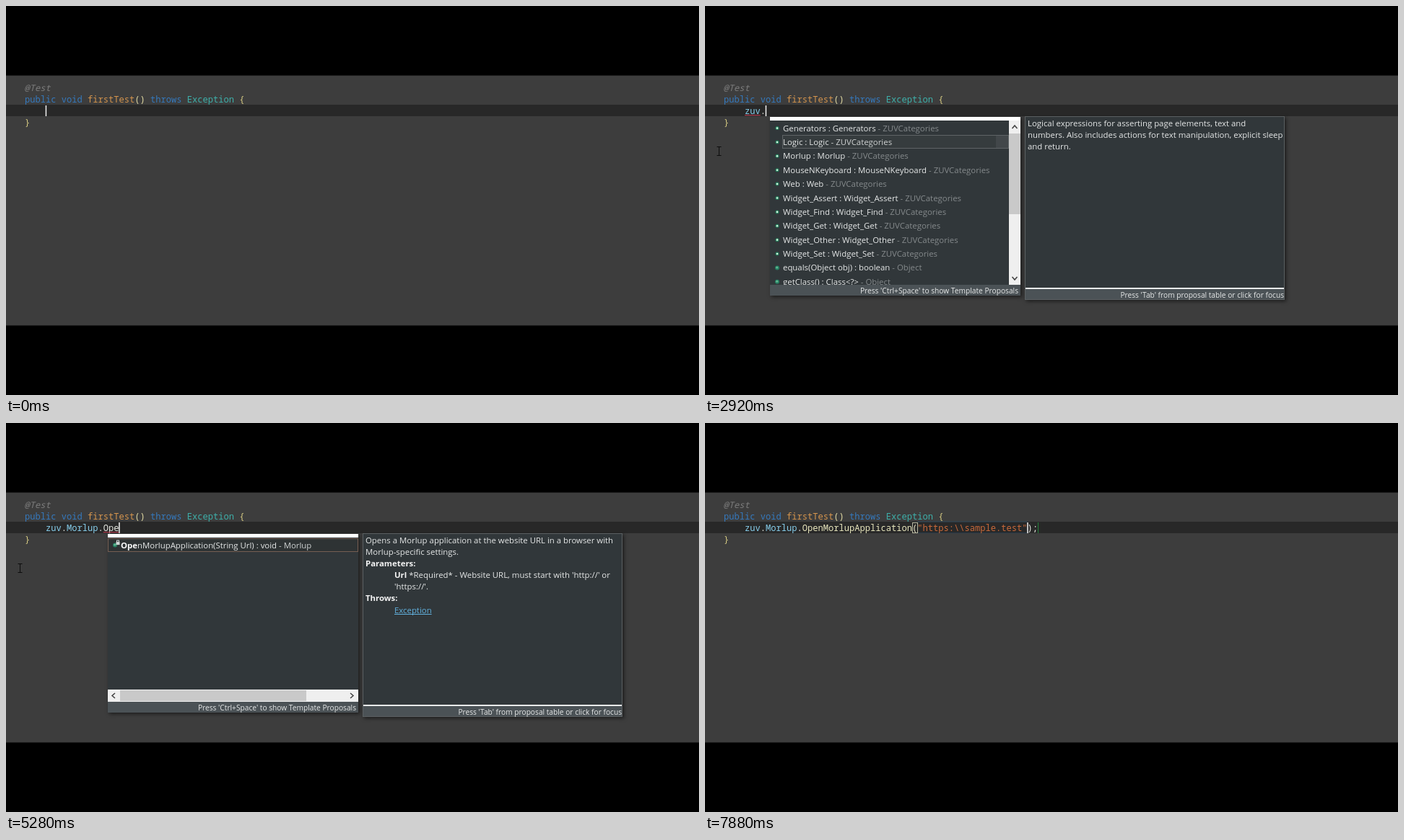
An HTML page with a canvas that plays this animation: 960x540 px, repeating every 7920 ms.

```html
<!DOCTYPE html>
<html lang="en">
<head>
<meta charset="utf-8">
<title>Code completion</title>
<style>
html, body { margin: 0; width: 100%; height: 100%; overflow: hidden; background: #000; }
canvas { display: block; width: 960px; height: 540px; }
</style>
</head>
<body>
<canvas id="stage" width="960" height="540"></canvas>
<script>
const ctx = document.getElementById('stage').getContext('2d');
const LOOP = 7920;
const CODE = '12.08px "Noto Sans Mono", "DejaVu Sans Mono", monospace';
const UI = '11.4px "Open Sans", "Noto Sans", sans-serif';
const UI_BOLD = 'bold ' + UI;
const UI_SMALL = '10.2px "Open Sans", "Noto Sans", sans-serif';
const CHAR = 7.25, INDENT = 55, ROW = 19.38;
const PANEL = '#31373a', BAR = '#4b5256', TEXT = '#e6e8e8', DIM = '#858a8c';

const OBJ = 'zuv', GROUP = 'Morlup', METHOD = 'OpenMorlupApplication';
const HEAD = OBJ + '.' + GROUP + '.';
const URL_TEXT = '"https:\\\\sample.test"';
const URL_X = INDENT + (HEAD.length + METHOD.length + 1) * CHAR;

const KEYS = [
  [0, ''], [560, 'z'], [720, 'zu'], [880, OBJ], [1120, OBJ + '.'],
  [3400, OBJ + '.' + GROUP], [3640, HEAD],
  [4160, HEAD + 'O'], [4560, HEAD + 'Op'], [4720, HEAD + 'Ope']
];
const INSERT = 5680, QUOTE = 6440, KEY_GAP = 56;

// "~" starts the dimmed part of a row, "|" toggles bold
const CATEGORIES = ['Generators', 'Logic', GROUP, 'MouseNKeyboard', 'Web',
  'Widget_Assert', 'Widget_Find', 'Widget_Get', 'Widget_Other', 'Widget_Set']
  .map(n => ({ text: `${n} : ${n}~ - ZUVCategories`, icon: 'field' }))
  .concat([
    { text: 'equals(Object obj) : boolean~ - Object', icon: 'method' },
    { text: 'getClass() : Class<?>~ - Object', icon: 'method' }
  ]);
const OPEN_TAIL = `MorlupApplication(String Url) : void~ - ${GROUP}`;
const MATCHES = [
  { text: 'hashC|o|de() : int~ - Object', icon: 'method' },
  { text: `L|o|gin(String Username, String Password, Boolean UseMpid) : void~ - ${GROUP}`, icon: 'final' },
  { text: `L|o|gout() : void~ - ${GROUP}`, icon: 'final' },
  { text: 'n|o|tify() : void~ - Object', icon: 'method' },
  { text: 'n|o|tifyAll() : void~ - Object', icon: 'method' },
  { text: '|O|pen' + OPEN_TAIL, icon: 'final' },
  { text: 't|o|String() : String~ - Object', icon: 'method' }
];
const MEMBERS = CATEGORIES.slice(10).concat(
  MATCHES.map(r => ({ ...r, text: r.text.replaceAll('|', '') })));

function rect(x, y, w, h, color) {
  ctx.fillStyle = color;
  ctx.fillRect(x, y, w, h);
}

function outline(x, y, w, h, color) {
  ctx.strokeStyle = color;
  ctx.lineWidth = 1;
  ctx.strokeRect(x + .5, y + .5, w - 1, h - 1);
}

function text(s, x, y, color, font, align = 'left') {
  ctx.font = font;
  ctx.textAlign = align;
  ctx.fillStyle = color;
  ctx.fillText(s, x, y);
  return x + ctx.measureText(s).width;
}

function code(parts, x, y) {
  for (const [s, color] of parts) {
    text(s, x, y, color, CODE);
    x += s.length * CHAR;
  }
}

function clipped(x, y, w, h, paint) {
  ctx.save();
  ctx.beginPath();
  ctx.rect(x, y, w, h);
  ctx.clip();
  paint();
  ctx.restore();
}

function chevron(x, y, dx, dy) {
  ctx.strokeStyle = '#404040';
  ctx.lineWidth = 1.5;
  ctx.beginPath();
  ctx.moveTo(x - 3.5 * dy - 2 * dx, y - 3.5 * dx - 2 * dy);
  ctx.lineTo(x + 2 * dx, y + 2 * dy);
  ctx.lineTo(x + 3.5 * dy - 2 * dx, y + 3.5 * dx - 2 * dy);
  ctx.stroke();
}

function dot(x, y, r, color) {
  ctx.fillStyle = color;
  ctx.beginPath();
  ctx.arc(x, y, r, 0, 7);
  ctx.fill();
}

function icon(kind, x, y) {
  if (kind === 'field') {
    dot(x, y, 2.5, '#25835f');
    dot(x, y, 1.3, '#d6f3df');
    return;
  }
  dot(x, y, 3, '#278064');
  dot(x - .3, y - .5, 1.5, '#63b891');
  if (kind === 'final') {
    rect(x + 1.5, y - 4.5, 5, 4, '#d3d9d8');
    outline(x + 2, y - 7, 4, 4, '#d3d9d8');
  }
}

function row(item, x, y, selected) {
  icon(item.icon, x - 8, y);
  const [main, tail] = item.text.split('~');
  main.split('|').forEach((s, i) => {
    x = text(s, x, y + 4, i % 2 ? '#fff' : TEXT, i % 2 ? UI_BOLD : UI);
  });
  text(tail, x, y + 4, selected ? '#cfd2d2' : DIM, UI);
}

function shadow(x, y, w, h) {
  ctx.save();
  ctx.shadowColor = 'rgba(0,0,0,.55)';
  ctx.shadowBlur = 5;
  ctx.shadowOffsetX = ctx.shadowOffsetY = 2;
  rect(x, y, w, h, PANEL);
  ctx.restore();
}

function scrollV(x) {
  rect(x, 159, 16, 228, '#efefef');
  rect(x, 177, 16, 112, '#c9c9c9');
  chevron(x + 8, 168, 0, -1);
  chevron(x + 8, 378, 0, 1);
}

function scrollH(x) {
  rect(x, 370, 347, 17, '#efefef');
  rect(x + 17, 371, 258, 15, '#c9c9c9');
  chevron(x + 8, 378.5, -1, 0);
  chevron(x + 338, 378.5, 1, 0);
}

function list(x, items, selected, vertical) {
  shadow(x, 154, 347, 248);
  rect(x, 154, 347, 5, '#fff');
  const inner = vertical ? 331 : 347, bottom = vertical ? 387 : 370;
  clipped(x, 159, inner, bottom - 159, () => {
    const top = Math.round(160 + selected * ROW);
    const left = vertical ? x + 17 : x;
    rect(left, top, x + inner - left, 19, vertical ? '#363c3e' : '#2e3334');
    if (vertical) rect(x + 313, top, 17, 19, '#42474a');
    outline(left, top, x + inner - left, 19, items.length === 1 ? '#755e52' : '#5f6466');
    items.forEach((item, i) => row(item, x + 18, 169.6 + i * ROW, i === selected));
  });
  if (vertical) scrollV(x + 331); else scrollH(x);
  rect(x, 387, 347, 15, BAR);
  text("Press 'Ctrl+Space' to show Template Proposals", x + 344, 399, TEXT, UI_SMALL, 'right');
}

function blankList(x) {
  shadow(x, 154, 347, 248);
  rect(x, 154, 347, 248, '#fdfdfd');
  scrollV(x + 331);
  rect(x, 386.5, 347, 1, '#303030');
}

function doc(x, paint) {
  shadow(x, 153, 360, 255);
  outline(x, 153, 360, 255, '#5b6062');
  paint(x + 4);
  rect(x + 1, 391, 358, 2, '#e8eaea');
  rect(x + 1, 393, 358, 14, BAR);
  text("Press 'Tab' from proposal table or click for focus", x + 359, 405, TEXT, UI_SMALL, 'right');
}

const line = n => 166.6 + n * 16.15;

function logicDoc(x) {
  ['Logical expressions for asserting page elements, text and',
    'numbers. Also includes actions for text manipulation, explicit sleep',
    'and return.'].forEach((s, i) => text(s, x, line(i), TEXT, UI));
}

function openDoc(x) {
  const body = x + 40;
  text(`Opens a ${GROUP} application at the website URL in a browser with`, x, line(0), TEXT, UI);
  text(`${GROUP}-specific settings.`, x, line(1), TEXT, UI);
  text('Parameters:', x, line(2), '#f4f4f4', UI_BOLD);
  const end = text('Url', body, line(3), '#f4f4f4', UI_BOLD);
  text(" *Required* - Website URL, must start with 'http://' or", end, line(3), TEXT, UI);
  text("'https://'.", body, line(4), TEXT, UI);
  text('Throws:', x, line(5), '#f4f4f4', UI_BOLD);
  const right = text('Exception', body, line(6), '#62b2df', UI);
  rect(body, line(6) + 1.5, right - body, 1, '#62b2df');
}

function paramHint() {
  rect(294, 120, 58, 17, '#23292c');
  outline(294, 120, 58, 17, '#596064');
  text('String Url', 295.5, 133, '#f6f6f6', UI_BOLD);
  shadow(294, 153, 63, 57);
  outline(294, 153, 63, 57, '#566064');
  rect(295, 154, 61, 19, '#3c4245');
  outline(295, 154, 62, 19, '#737a7c');
  text('Url', 299, 168, TEXT, UI);
  text('null', 299, 187.5, TEXT, UI);
}

function ibeam(x, y) {
  rect(x - .5, y - 6, 1, 12, '#0c0c0c');
  rect(x - 3, y - 6.5, 6, 1, '#0c0c0c');
  rect(x - 3, y + 5.5, 6, 1, '#0c0c0c');
}

function underline(from, to) {
  rect(INDENT + from * CHAR, 151, (to - from) * CHAR, 1.2, '#b03a4c');
}

function typedLine(t) {
  const cyan = '#86cdea', plain = '#e4e6df', pale = '#e8e6bd';
  if (t < INSERT) {
    const s = KEYS.filter(k => k[0] <= t).pop()[1];
    const [a, b, c] = s.split('.');
    code([[a, cyan], [b === undefined ? '' : '.', plain], [b || '', cyan],
      [c === undefined ? '' : '.', plain], [c || '', plain]], INDENT, 149.8);
    return INDENT + s.length * CHAR;
  }
  let arg = 'Url', typed = 3;
  if (t >= QUOTE) {
    typed = Math.min(URL_TEXT.length, 1 + Math.floor((t - QUOTE) / KEY_GAP));
    arg = URL_TEXT.slice(0, typed) + (typed < URL_TEXT.length ? '"' : '');
  }
  const end = URL_X + arg.length * CHAR;
  if (t < QUOTE) {
    rect(URL_X, 138, 3 * CHAR, 14, '#1c2023');
  } else {
    rect(URL_X, 136.5, end - URL_X, 1, '#304a5c');
    rect(URL_X, 152, end - URL_X, 1, '#263848');
  }
  code([[OBJ, cyan], ['.', plain], [GROUP, cyan], ['.', plain], [METHOD, pale],
    ['(', '#f0eccb'], [arg, t < QUOTE ? plain : '#c9693a'], [');', plain]], INDENT, 149.8);
  rect(end + 2 * CHAR, 138, 1, 15, '#22803a');
  if (typed === URL_TEXT.length) outline(287, 138, 8, 15, '#b9b9a2');
  return URL_X + typed * CHAR;
}

function draw(t) {
  const during = (a, b) => t >= a && t < b;
  rect(0, 0, 960, 540, '#000');
  rect(0, 96.5, 960, 347, '#3d3d3d');
  rect(0, 137, 960, 16, '#282828');

  text('@Test', 25.5, 117.6, '#7d7d7d', 'italic ' + CODE);
  code([['public void ', '#3579bd'], ['firstTest', '#d4944d'], ['() ', '#e5dda5'],
    ['throws ', '#3579bd'], ['Exception ', '#3eb0aa'], ['{', '#d9cd84']], 26, 133.7);
  code([['}', '#d9cd84']], 26, 166.1);

  const caret = typedLine(t);
  const start = HEAD.length;
  if (during(2100, 3400)) underline(0, 3);
  if (during(4000, 4900)) underline(4, start - 1);
  if (during(4900, INSERT)) underline(start, start + 3);
  if (during(INSERT, 7000)) underline(start, start + METHOD.length + 6);
  rect(caret - .3, 138, 1.5, 15, '#f0f0f0');

  if (t >= 1240 && t < 7000) ibeam(t < 5800 ? 19.5 : 17, 201.5);

  if (during(1560, 1680)) blankList(90);
  if (during(1680, 3400)) list(90, CATEGORIES, t < 2400 ? 0 : t < 3200 ? 1 : 2, true);
  if (during(2640, 3400)) doc(443, logicDoc);
  if (during(3960, 4160)) list(141, MEMBERS, 0, false);
  if (during(4160, 4560)) list(141, MATCHES, 0, false);
  if (during(4560, INSERT)) {
    const hit = t < 4720 ? '|Op|en' : '|Ope|n';
    list(141, [{ text: hit + OPEN_TAIL, icon: 'final' }], 0, false);
  }
  if (during(5080, INSERT)) doc(494, openDoc);
  if (during(5840, QUOTE)) paramHint();
}

const begin = performance.now();
function frame() {
  draw((performance.now() - begin) % LOOP);
  requestAnimationFrame(frame);
}
frame();
</script>
</body>
</html>
```
